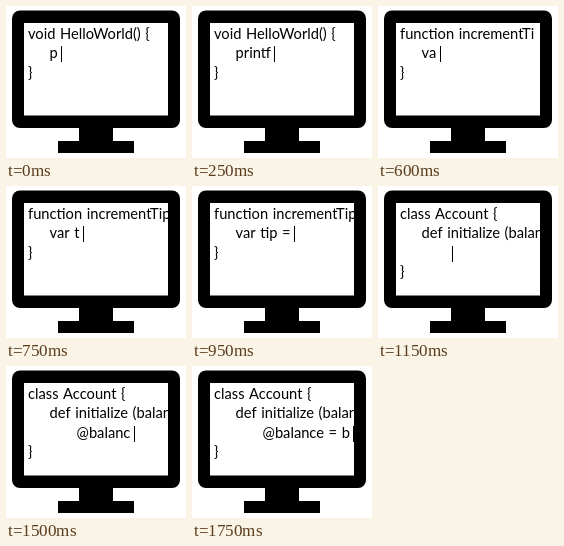
An HTML page with a canvas for the animation above (1800 ms loop, 180 by 152 pixels).

```html
<!DOCTYPE html>
<html lang="en">
<head>
<meta charset="utf-8">
<title>Typing code on a monitor</title>
<style>
  html, body { margin: 0; width: 100%; height: 100%; overflow: hidden; background: #fff; }
  canvas { display: block; }
</style>
</head>
<body>
<canvas id="stage" width="180" height="152"></canvas>
<script>
const ctx = document.getElementById('stage').getContext('2d');
const STEP = 50, LOOP = 1800;
const TOP = 33, LEADING = 19.4, INDENTS = [22, 43.6, 70.6];
const CARET_GAP = 3.6;

// Each scene types one character per step, beginning with `typed` characters.
const scenes = [
  { start: 0, typed: 1, code: 'printf("Hell', head: ['void HelloWorld() {'] },
  { start: 12, typed: 2, code: 'var tip = 0;', head: ['function incrementTip'] },
  { start: 23, typed: 0, code: '@balance = b', head: ['class Account {', 'def initialize (balance)'] }
];

function box(x, y, w, h, color, radius = 0) {
  ctx.fillStyle = color;
  ctx.beginPath();
  ctx.roundRect(x, y, w, h, radius);
  ctx.fill();
}

function line(text, row, indent) {
  ctx.fillText(text, INDENTS[indent], TOP + row * LEADING);
}

function draw(time) {
  const step = Math.floor((time % LOOP) / STEP);
  const scene = scenes.findLast(s => s.start <= step);
  const local = step - scene.start;
  const typed = scene.code.slice(0, scene.typed + local);
  const row = scene.head.length;

  box(0, 0, 180, 152, '#fff');
  box(6, 4.5, 168, 117.5, '#000', 8);
  box(73, 121, 34, 15, '#000');
  box(52, 135, 76, 12, '#000');
  box(18, 17, 144, 92.5, '#fff');

  ctx.save();
  ctx.beginPath();
  ctx.rect(18, 17, 144, 92.5);
  ctx.clip();
  ctx.fillStyle = '#000';
  ctx.font = '14.7px Lato, Carlito, sans-serif';
  ctx.wordSpacing = '0.8px';

  scene.head.forEach((text, i) => {
    // The long function name is one letter short on its first step.
    const late = scene === scenes[1] && local === 0;
    line(late ? text.slice(0, -1) : text, i, i);
  });
  line(typed, row, row);
  line('}', row + 1, 0);

  const caret = INDENTS[row] + ctx.measureText(typed).width + CARET_GAP;
  ctx.fillRect(Math.round(caret), Math.round(TOP + row * LEADING - 12), 1, 16);
  ctx.restore();
}

const begin = performance.now();
function tick() {
  draw(performance.now() - begin);
  requestAnimationFrame(tick);
}
tick();
</script>
</body>
</html>
```
